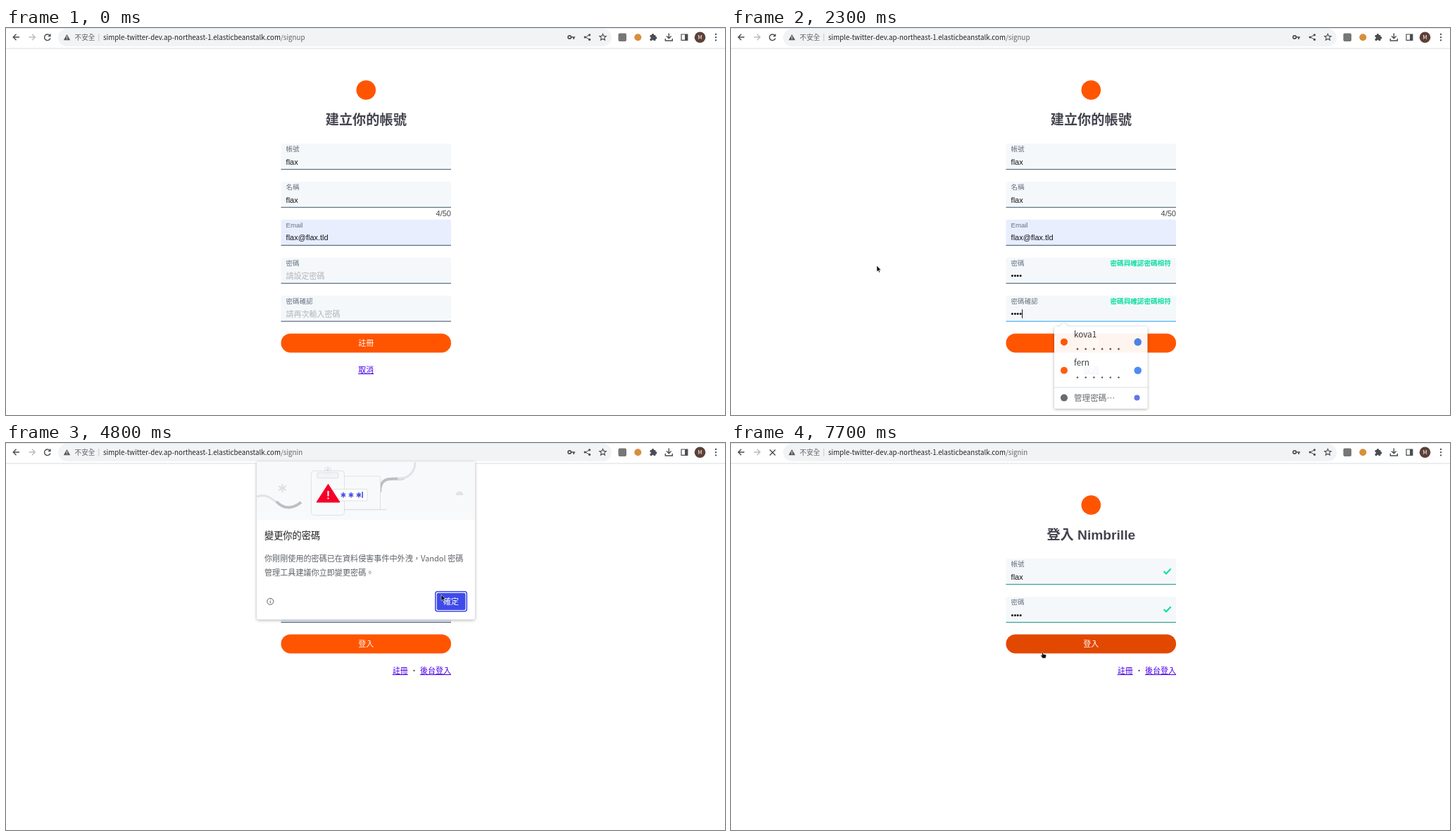
An HTML page that plays this animation: 1021x549 px, repeating every 8 s.

```html
<!DOCTYPE html>
<html lang="zh-Hant">
<head>
<meta charset="utf-8">
<style>
html, body { margin: 0; width: 100%; height: 100%; overflow: hidden; background: #fff; }
svg { display: block; width: 1021px; height: 549px; }
text { font-family: "Liberation Sans", "Noto Sans CJK TC", "Noto Sans CJK", sans-serif; white-space: pre; }
.ui { font-family: "Noto Sans CJK TC", "Noto Sans CJK", "Noto Sans", sans-serif; }
.bold { font-weight: 700; }
.mid { text-anchor: middle; }
.end { text-anchor: end; }
.link { text-decoration: underline; }
.popup { filter: drop-shadow(0 1px 2px rgba(0,0,0,.32)); }
</style>
</head>
<body>
<svg id="stage" viewBox="0 0 1021 549"></svg>
<script>
const stage = document.getElementById('stage');
const LOOP = 8000, TICK = 100, ROW = 53.9;
const ORANGE = '#ff5500', DARK = '#e24800', GREEN = '#0adf9f', GRAY = '#657786', BLUE = '#50b5ff', INK = '#44444f';
const PALE = '#f5f8fa', FILLED = '#e8eefe', LINK = '#4c00e8';

// Drawing helpers
const text = (x, y, s, size, fill, cls = '') =>
  `<text x="${x}" y="${y}" font-size="${size}" fill="${fill}" class="${cls}">${s}</text>`;
const rect = (x, y, w, h, fill, r = 0, extra = '') =>
  `<rect x="${x}" y="${y}" width="${w}" height="${h}" rx="${r}" fill="${fill}" ${extra}/>`;
const disc = (x, y, r, fill) => `<circle cx="${x}" cy="${y}" r="${r}" fill="${fill}"/>`;
const line = (d, color, w = 1.3, extra = '') =>
  `<path d="${d}" fill="none" stroke="${color}" stroke-width="${w}" ${extra}/>`;
const shape = (d, fill, extra = '') => `<path d="${d}" fill="${fill}" ${extra}/>`;
const group = (x, y, body, extra = '') => `<g transform="translate(${x} ${y})" ${extra}>${body}</g>`;

// Value of the last [time, value] step that has begun
const at = (t, steps) => steps.reduce((v, [from, next]) => t >= from ? next : v, undefined);
const typed = (t, start, step, max) => Math.max(0, Math.min(max, Math.floor((t - start) / step) + 1));
const dots = n => '•'.repeat(n);

function toolbar(t) {
  const c = '#4a4d51';
  const loading = (t >= 2900 && t < 3800) || t >= 7700;
  const path = t < 3600 ? '/signup' : '/signin';
  const reload = loading
    ? line('M55 9.5l8 8M63 9.5l-8 8', c, 1.4)
    : line('M62 10.3a4.3 4.3 0 1 0 1 4.2', c, 1.4) + shape('M63.6 8v4.3h-4.3z', c);
  return rect(0, 0, 1021, 29, '#fff') + rect(0, 0, 1021, 1, '#dfe3ee') + rect(0, 28.5, 1021, 1, '#d9dbdf')
    + rect(74, 1, 786, 25, '#f1f3f4', 12.5)
    + line('M19 13h-8M14.5 8.8L10.3 13l4.2 4.2', c, 1.4)
    + line('M32.5 13h8M37 8.8l4.2 4.2-4.2 4.2', '#b9bbbe', 1.4)
    + reload
    + shape('M86.5 9l4.7 8.3h-9.4z', '#55585c') + rect(86, 11.8, 1, 2.5, '#fff') + rect(86, 15, 1, 1, '#fff')
    + text(97.5, 17, '不安全', 9.7, '#5f6368', 'ui') + rect(131.3, 8, 1, 11, '#c6c8cb')
    + text(138, 17, `simple-twitter-dev.ap-northeast-1.elasticbeanstalk.com<tspan fill="#62666a">${path}</tspan>`, 9.75, '#202124', 'ui')
    // key, share, star
    + line('M802.5 13a2.2 2.2 0 1 1-4.4 0a2.2 2.2 0 1 1 4.4 0h5.6M806.2 13v3', c, 1.7)
    + line('M828.5 10l-6 3 6 3.2', c, 1) + disc(828.6, 9.8, 1.6, c) + disc(822.2, 13, 1.6, c) + disc(828.6, 16.4, 1.6, c)
    + line('M847.5 8.4l1.4 3 3.3.3-2.5 2.2.8 3.2-3-1.7-3 1.7.8-3.2-2.5-2.2 3.3-.3z', c, 1.1)
    // extensions
    + rect(869.5, 7.5, 11.5, 11.5, '#777', 2) + disc(897.3, 13.3, 5, '#d98f3c')
    + rect(914.5, 10, 8, 8, c, 1) + disc(918.5, 9.8, 1.7, c) + disc(922.7, 14, 1.7, c)
    + disc(914.7, 14, 1.2, '#fff') + disc(918.5, 18, 1.2, '#fff')
    + line('M941.3 7.5v7M938 11.5l3.3 3.3 3.3-3.3M936.3 15v3h10v-3', c, 1.4)
    + line('M959 9h8.8v8.4H959z', c, 1.2) + rect(964, 9, 4, 8.4, c)
    + disc(985.5, 13.2, 7.8, '#5d4037') + text(985.5, 16, 'M', 7.8, '#fff', 'ui mid')
    + [9, 13.2, 17.4].map(y => disc(1008, y, 1.15, c)).join('');
}

function field(i, f) {
  const y = 164 + ROW * i, size = f.size || 11;
  const value = f.value || '';
  const caretX = 397.9 + (f.bullets || 0) * 3.8;
  return shape(`M390.5 ${y + 36.5}v-33.5q0-3 3-3h235.5q3 0 3 3v33.5z`, f.bg || PALE)
    + rect(390.5, y + 35.9, 241.5, 1.3, f.border || GRAY)
    + text(397.5, y + 11.4, f.label, 9.6, '#697282')
    + (value ? text(397.6, y + 29.6, value, size, '#15171c') : text(397.6, y + 30.6, f.hint || '', 11, '#b2b5ba'))
    + (f.note ? text(624.8, y + 11.5, f.note, 9.6, f.noteColor, 'bold end') : '')
    + (f.check ? line(`M614.6 ${y + 18}l3.4 3.4 6.6-7`, GREEN, 2.1) : '')
    + (f.caret ? rect(caretX, y + 19.6, 1, 12.5, '#111') : '');
}

const button = (y, label, fill) =>
  rect(390.5, y, 241.5, 27, fill, 13.5) + text(511.2, y + 17.4, label, 11, '#fff', 'mid');

const header = title => disc(511.3, 88, 13.8, ORANGE) + text(511.3, 136.7, title, 19.2, INK, 'bold mid');

function popup(i, opacity = 1, hover = false) {
  const account = (y, name) => disc(14, y + 22, 5, ORANGE) + disc(118.7, y + 22, 5.3, '#4285f4')
    + text(28, y + 15.7, name, 11.7, '#303134', 'ui')
    + [0, 1, 2, 3, 4, 5].map(k => disc(33 + k * 11.7, y + 32, 1.3, '#55585c')).join('');
  return group(459, 207.8 + ROW * i,
    shape('M0 2q0-2 2-2H7l6.5-5 6.5 5H130.5q2 0 2 2V114.500q0 2-2 2H2q-2 0-2-2z', '#fff')
    + (hover ? rect(0, 2, 132.5, 40.5, '#e8e8e8') : '')
    + account(0, 'kova1') + account(40.3, 'fern')
    + rect(0, 86, 132.5, 1, '#dadce0')
    + disc(14, 101.2, 5, '#5f6368') + text(28, 105.2, '管理密碼…', 11.6, '#5f6368', 'ui') + disc(117.5, 101.2, 4, '#5b6ee8'),
    `class="popup" opacity="${opacity}"`);
}

function signup(t) {
  const sent = t >= 2900;
  const first = typed(t, 1300, 100, 4), second = typed(t, 2000, 100, 4);
  const match = second === 4;
  const note = first ? (match ? '密碼與確認密碼相符' : '密碼與確認密碼不相符') : '';
  const noteColor = match ? GREEN : '#fc5a5a';
  const sentBorder = at(t, [[0, GRAY], [2900, '#4a8f8b'], [3000, '#37b395'], [3200, '#17cf9c'], [3300, GREEN]]);
  const focus = sent ? -1 : at(t, [[0, -1], [800, 3], [2000, 4]]);
  const row = (i, f) => field(i, { border: i === focus ? BLUE : sentBorder, caret: i === focus, check: sent && i !== 2, ...f });
  const shade = at(t, [[0, ORANGE], [2900, '#f55100'], [3000, '#ee4e00'], [3200, '#e64a00'], [3300, DARK]]);
  const list = at(t, [[0, ''], [900, popup(3)], [1300, ''], [1900, popup(4)], [2300, popup(4, .94)], [2400, popup(4, .4)], [2500, '']]);
  return header('建立你的帳號')
    + row(0, { label: '帳號', value: 'flax' })
    + row(1, { label: '名稱', value: 'flax' })
    + text(632, 266.6, '4/50', 11, INK, 'end')
    + row(2, { label: 'Email', value: 'flax@flax.tld', bg: FILLED })
    + row(3, { label: '密碼', hint: '請設定密碼', value: dots(first), bullets: first, note, noteColor })
    + row(4, { label: '密碼確認', hint: '請再次輸入密碼', value: dots(second), bullets: second, note, noteColor })
    + button(433.4, '註冊', shade)
    + text(511.2, 489, '取消', 11, LINK, 'mid link')
    + list;
}

function signin(t) {
  const sent = t >= 7700, preview = t >= 5900 && t < 6100;
  const focus = sent ? -1 : at(t, [[0, -1], [5700, 0], [6900, 1]]);
  const border = i => sent ? '#40a699' : i === focus ? BLUE : GRAY;
  const name = at(t, [[0, 'kova1'], [6100, 'f'], [6200, 'fl'], [6700, 'flax']]);
  const count = at(t, [[0, 8], [6500, 0], [7100, 2], [7300, 4]]);
  const size = preview ? 9.2 : 11;
  const list = at(t, [[0, ''], [5700, popup(0)], [5900, popup(0, 1, true)], [6100, popup(0, .4)], [6200, ''],
    [6700, popup(1)], [7100, popup(1, .9)], [7300, popup(1, .4)], [7400, '']]);
  return header('登入 Nimbrille')
    + field(0, { label: '帳號', value: name, size, bg: t < 6100 ? FILLED : PALE, border: border(0), check: sent,
        caret: focus === 0 && t < 6100 })
    + field(1, { label: '密碼', value: dots(count), bullets: count, size, bg: t < 6500 ? FILLED : PALE, border: border(1),
        check: sent, caret: focus === 1 })
    + button(271.4, '登入', sent ? DARK : ORANGE)
    + text(548.7, 327, '註冊', 11, LINK, 'link') + text(579.5, 327, '・', 11, INK, 'mid')
    + text(632, 327, '後台登入', 11, LINK, 'end link')
    + list;
}

function dialog(t) {
  const opacity = at(t, [[0, 0], [4300, .5], [4400, 1], [5300, .5], [5500, 0]]);
  if (!opacity) return '';
  const edge = 'stroke="#dfe1e5" stroke-width="1"', blue = '#3f4be8';
  const star = (x, y, r, c, w) => line([0, 60, 120].map(a => {
    const dx = r * Math.sin(a * Math.PI / 180), dy = r * Math.cos(a * Math.PI / 180);
    return `M${x - dx} ${y - dy}L${x + dx} ${y + dy}`;
  }).join(''), c, w);
  return `<g opacity="${opacity}">`
    + rect(356, 26.5, 310, 224, '#fff', 3, 'class="popup"') + rect(356, 27, 310, 82, '#f8f9fa', 2)
    + line('M356 76c14-4 20 2 28 8', '#e1e3e6', 3) + line('M384 83c10 11 23 11 35 1', '#bdbfc2', 4)
    + line('M531 70c0-28 24-16 34-20', '#bdbfc2', 4) + line('M556 51c15 0 25-9 25-24', '#e1e3e6', 3)
    + star(392.5, 64, 6, '#dfe1e4', 2.2) + shape('M638.5 74a5.5 5.5 0 0 1 11 0z', '#e1e3e6')
    + rect(480, 47, 51.5, 47.5, '#f8f9fa', 2, edge) + line('M475 94.5h65', '#dfe1e5', 1.5)
    + rect(433.5, 39.5, 47, 63, '#f8f9fa', 4, edge) + rect(442, 42, 30, 8, '#f1f3f4', 2, edge)
    + `<circle cx="457" cy="38.5" r="4.5" fill="#f1f3f4" ${edge}/>` + disc(457, 38.5, 1.8, '#d5d7da')
    + rect(465, 65.5, 48, 16.5, '#fff', 1, edge)
    + [479, 490, 501].map(x => star(x, 73.7, 3.7, blue, 1.5)).join('') + rect(505.5, 69, 1.5, 9, blue)
    + shape('M457.5 58.5L474 84h-33z', '#f50028', 'stroke="#f50028" stroke-linejoin="round"')
    + rect(456.5, 68, 2, 7.5, '#fff') + rect(456.5, 77.5, 2, 2, '#fff')
    + text(367, 136, '變更你的密碼', 13.2, '#202124', 'ui')
    + text(367, 168, '你剛剛使用的密碼已在資料侵害事件中外洩，Vandol 密碼', 11.1, '#5f6368', 'ui')
    + text(367, 188, '管理工具建議你立即變更密碼。', 11.1, '#5f6368', 'ui')
    + '<circle cx="375.3" cy="224.8" r="4.5" fill="none" stroke="#5f6368"/>'
    + rect(374.8, 224, 1, 3.2, '#5f6368') + rect(374.8, 222, 1, 1, '#5f6368')
    + rect(609.8, 210.8, 44.5, 28, '#fff', 3, `stroke="${blue}" stroke-width="1.6"`)
    + rect(611.7, 212.7, 40.7, 24.2, t >= 5100 ? '#5f69ee' : blue, 2)
    + text(632, 228.8, '確定', 11, '#fff', 'ui mid')
    + '</g>';
}

const TRACK = [[200, 560, 290], [700, 440, 349], [1000, 380, 349], [1200, 371, 348], [1400, 331, 345], [1900, 331, 345],
  [2300, 207, 337], [3100, 207, 337], [3300, 201, 396], [3800, 201, 396], [3900, 424, 199], [4000, 424, 199],
  [4100, 432, 188], [4500, 437, 188], [4800, 618, 215], [5600, 618, 215], [5700, 480, 190], [5800, 480, 190],
  [5900, 473, 211], [6000, 473, 211], [6200, 290, 288], [6400, 290, 288], [6500, 300, 246], [6800, 300, 246],
  [6900, 255, 248], [7000, 255, 248], [7100, 246, 253], [7200, 246, 253], [7400, 442, 297], [LOOP, 442, 297]];

function cursor(t) {
  const k = TRACK.findIndex(([time]) => time > t);
  if (k < 1) return '';
  const [t0, x0, y0] = TRACK[k - 1], [t1, x1, y1] = TRACK[k];
  const p = (t - t0) / (t1 - t0);
  const art = t >= 7400
    ? shape('M-.5 0q1-1 1.5 0v2.500l4 .8q.8.3.6 1.200l-.8 3.800h-4.300l-2.800-3.700q.4-1 1.800 0z', '#111', 'stroke="#fff" stroke-width=".4"')
    : shape('M0 0v8.800l2-1.800 1.400 3 1.400-.7-1.400-2.800h2.700z', '#111', 'stroke="#fff" stroke-width=".5"');
  return group(x0 + (x1 - x0) * p, y0 + (y1 - y0) * p, art);
}

let shown = -1;
function play(now) {
  const t = Math.floor(now % LOOP / TICK) * TICK;
  if (t !== shown) {
    shown = t;
    stage.innerHTML = toolbar(t) + (t < 3800 ? signup(t) : signin(t)) + dialog(t) + cursor(t);
  }
  requestAnimationFrame(() => play(performance.now()));
}
play(performance.now());
</script>
</body>
</html>
```
